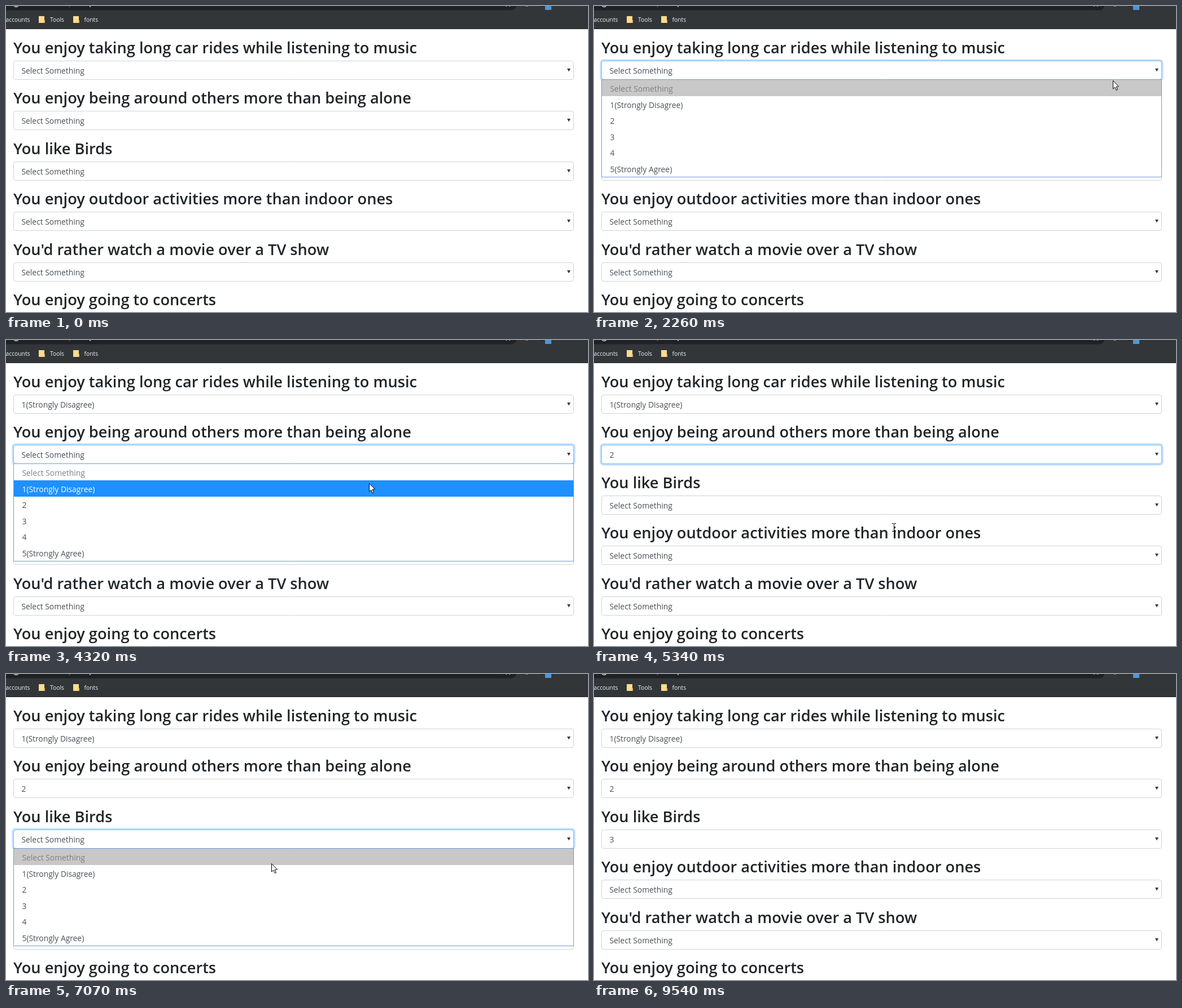
Recreate the animation shown at these times as an HTML page with a canvas. Size 1031 px wide and 543 px high, loop 9.61 s.

```html
<!DOCTYPE html>
<html lang="en">
<head>
<meta charset="utf-8">
<title>Survey</title>
<style>
html, body { margin: 0; width: 100%; height: 100%; overflow: hidden; background: #fff; }
canvas { display: block; }
</style>
</head>
<body>
<canvas id="stage" width="1031" height="543"></canvas>
<script>
const ctx = document.getElementById('stage').getContext('2d');
const LOOP = 9610, PITCH = 89.46, ROW = 28.6;
const LEFT = 13, WIDTH = 993, BOX = 34;
const FAMILY = '"Open Sans", "Noto Sans", sans-serif';
const HEAD = `600 27.2px ${FAMILY}`;
const BODY = `13.85px ${FAMILY}`;
const BAR = `10.3px ${FAMILY}`;

const questions = [
  'You enjoy taking long car rides while listening to music',
  'You enjoy being around others more than being alone',
  'You like Birds',
  'You enjoy outdoor activities more than indoor ones',
  "You'd rather watch a movie over a TV show",
  'You enjoy going to concerts'
];
const options = ['Select Something', '1(Strongly Disagree)', '2', '3', '4', '5(Strongly Agree)'];

// When each select gains focus, has an option picked and loses focus
const visits = [
  { focus: 1700, pick: 2970, blur: 3620 },
  { focus: 3620, pick: 4770, blur: 6090 },
  { focus: 6530, pick: 7720, blur: 9380 }
];

// The pointer enters at the bottom, makes these moves, then leaves
const entry = { x: 945, y: 531 };
const moves = [
  { from: 200, to: 390, x: 956, y: 309 },
  { from: 640, to: 820, x: 948, y: 138 },
  { from: 1310, to: 1350, x: 938, y: 125 },
  { from: 2220, to: 2810, x: 800, y: 174 },
  { from: 3340, to: 3600, x: 725, y: 203 },
  { from: 4130, to: 4740, x: 570, y: 300 },
  { from: 5190, to: 5340, x: 531, y: 332 },
  { from: 5640, to: 5940, x: 514, y: 305 },
  { from: 7030, to: 7070, x: 470, y: 336 },
  { from: 7070, to: 7700, x: 390, y: 406 },
  { from: 8040, to: 8290, x: 740, y: 534 }
];
const SHOW = 230, HIDE = 8290;

const ramp = (t, start, length) => Math.max(0, Math.min(1, (t - start) / length));
const easeOut = f => f * (2 - f);
const offset = i => Math.round(PITCH * i);

function rect(color, x, y, w, h) {
  ctx.fillStyle = color;
  ctx.fillRect(x, y, w, h);
}

function text(str, x, y, font, color) {
  ctx.font = font;
  ctx.fillStyle = color;
  ctx.fillText(str, x, y);
}

function outline(x, y, w, h, r, color, line) {
  ctx.beginPath();
  ctx.roundRect(x, y, w, h, r);
  ctx.strokeStyle = color;
  ctx.lineWidth = line;
  ctx.stroke();
}

function shape(points, x, y, fill, stroke) {
  ctx.beginPath();
  for (const [px, py] of points) ctx.lineTo(x + px, y + py);
  ctx.closePath();
  ctx.fillStyle = fill;
  ctx.fill();
  if (!stroke) return;
  ctx.strokeStyle = stroke;
  ctx.lineWidth = 1;
  ctx.stroke();
}

function toolbar() {
  rect('#323639', 0, 0, 1031, 41);
  rect('#202326', 0, 40, 1031, 1);
  ctx.fillStyle = '#202124';
  ctx.beginPath();
  ctx.roundRect(-20, -20, 925, 27.5, 10);
  ctx.fill();
  // Lower edges of the cropped icons and address
  ctx.beginPath();
  ctx.arc(18, -3, 4.5, 0, 7);
  ctx.strokeStyle = '#c8cacc';
  ctx.lineWidth = 1.5;
  ctx.stroke();
  rect('#7770b8', 112, 0, 1, 2);
  rect('#a0a3a6', 148, 0, 2, 2);
  for (const x of [885, 891]) rect('#a8abae', x, 0, 2, 1);
  rect('#b99a45', 921, 0, 3, 1);
  rect('#17191b', 947, 0, 5, 1);
  rect('#4a98dd', 955, 0, 11, 7);
  for (const x of [58, 119]) {
    rect('#ffdc8c', x, 18, 10, 12);
    rect('#e8b95c', x + 9, 25, 2, 5);
  }
  text('accounts', -0.5, 28, BAR, '#f1f3f4');
  text('Tools', 78, 28, BAR, '#f1f3f4');
  text('fonts', 138.5, 28, BAR, '#f1f3f4');
}

function select(i, t) {
  const y = 97 + offset(i), v = visits[i];
  const border = color => outline(LEFT + .5, y + .5, WIDTH - 1, BOX - 1, 3.5, color, 1);
  border('#ced4da');
  if (v) {
    ctx.globalAlpha = ramp(t, v.focus, 150) - ramp(t, v.blur, 150);
    outline(LEFT - 1.25, y - 1.25, WIDTH + 2.5, BOX + 2.5, 5, '#bfdeff', 2.5);
    border('#80bdff');
    ctx.globalAlpha = 1;
  }
  text(options[v && t >= v.pick ? i + 1 : 0], 27.5, y + 23, BODY, '#495057');
  shape([[0, 0], [6, 0], [3, 5.5]], 994, y + 14, '#343a40');
}

function popup(i, t, pointerY) {
  const v = visits[i], top = 131 + offset(i);
  const alpha = ramp(t, v.focus + 160, 160) - ramp(t, v.pick, 120);
  if (alpha <= 0) return;
  const active = Math.max(0, Math.floor((pointerY - top) / ROW));
  ctx.globalAlpha = alpha;
  rect('#fff', LEFT, top - 1, WIDTH, 174);
  options.forEach((label, k) => {
    const y = Math.round(top + ROW * k), on = k === active;
    if (on) rect(k ? '#1e90ff' : '#c8c8c8', LEFT + 1, y, WIDTH - 2, 29);
    text(label, 28.5, y + 21, BODY, !k ? '#808080' : on ? '#fff' : '#495057');
  });
  outline(LEFT + .5, top - .5, WIDTH - 1, 173, 0, '#6c9bd9', 1);
  ctx.globalAlpha = 1;
}

function pointerAt(t) {
  let { x, y } = entry;
  for (const m of moves) {
    const f = easeOut(ramp(t, m.from, m.to - m.from));
    x += (m.x - x) * f;
    y += (m.y - y) * f;
  }
  return { x: Math.round(x), y: Math.round(y) };
}

function overHeading({ x, y }) {
  const i = Math.floor((y - 55) / PITCH);
  if (!questions[i] || y - 55 - i * PITCH > 35) return false;
  ctx.font = HEAD;
  return x < LEFT + ctx.measureText(questions[i]).width;
}

function pointer(p, open) {
  if (!open && overHeading(p)) {
    rect('#000', p.x, p.y - 6, 1, 13);
    for (const y of [p.y - 7, p.y + 7]) {
      rect('#000', p.x - 3, y, 3, 1);
      rect('#000', p.x + 1, y, 3, 1);
    }
    return;
  }
  shape([[0, 0], [0, 14.5], [3.3, 11.5], [5.7, 17], [8, 16], [5.6, 10.7], [10, 10.3]],
    p.x + .5, p.y + .5, '#fff', '#000');
}

function draw(now) {
  const t = now % LOOP, p = pointerAt(t);
  rect('#fff', 0, 0, 1031, 543);
  toolbar();
  questions.forEach((q, i) => {
    text(q, LEFT, 84 + offset(i), HEAD, '#212529');
    if (i < 5) select(i, t);
  });
  visits.forEach((v, i) => popup(i, t, p.y));
  const open = visits.some(v => t > v.focus && t < v.pick + 120);
  if (t >= SHOW && t < HIDE) pointer(p, open);
}

const start = performance.now();
function tick() {
  draw(performance.now() - start);
  requestAnimationFrame(tick);
}
tick();
</script>
</body>
</html>
```
